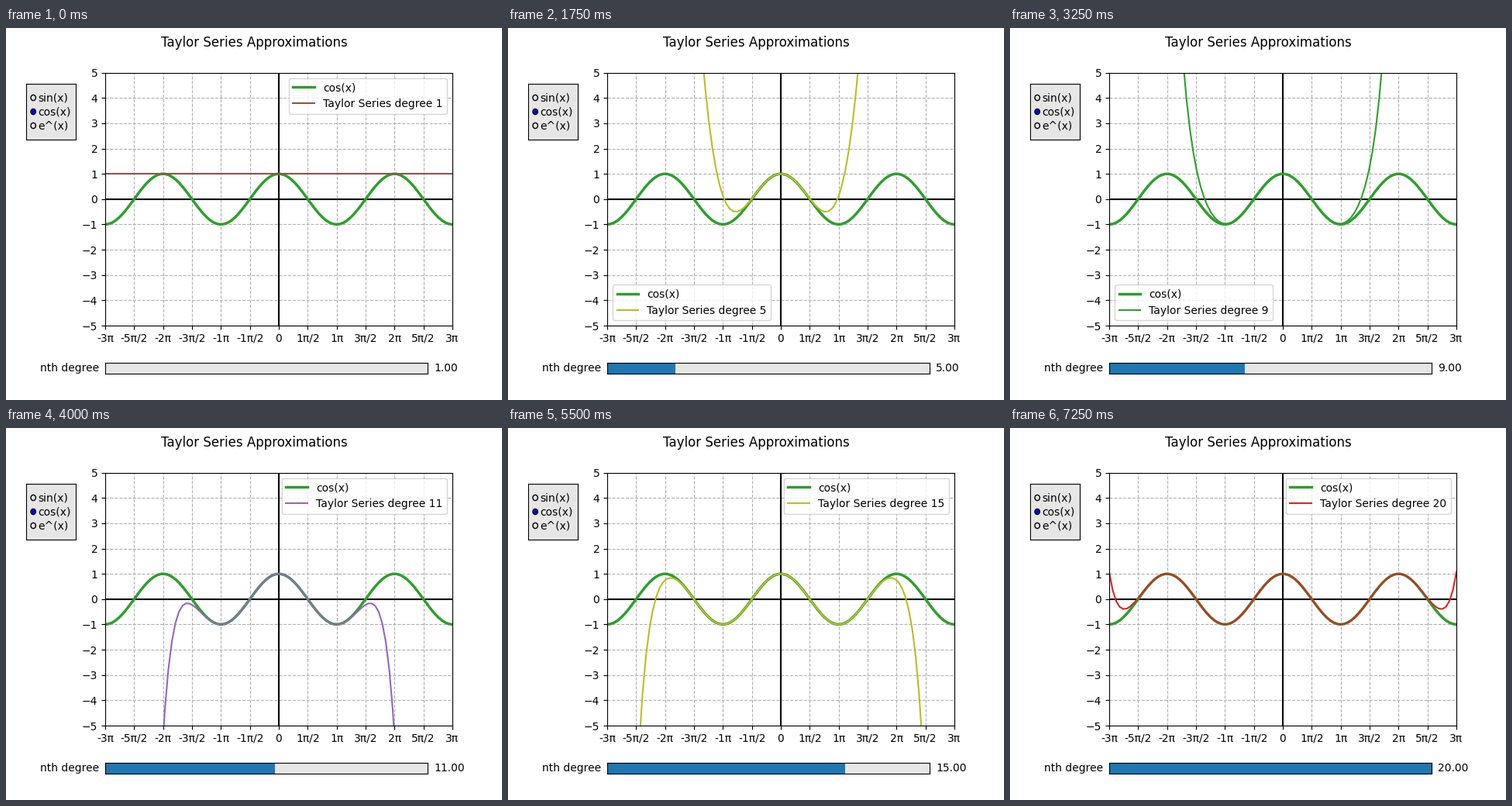
Write a matplotlib script that moves like this. It is 640 px wide and 480 px high and loops after 7750 ms.

```python
import math

import numpy as np
import matplotlib.pyplot as plt
from matplotlib.animation import FuncAnimation
from matplotlib.patches import Circle

TICK_MS = 250
TICKS = 31
STEP_MS = 380
MAX_DEGREE = 20
PANEL = "0.9"


def taylor_cos(x, degree):
    return sum((-1) ** (k // 2) * x ** k / math.factorial(k)
               for k in range(0, degree + 1, 2))


def pi_label(halves):
    if halves == 0:
        return "0"
    return f"{halves // 2}π" if halves % 2 == 0 else f"{halves}π/2"


def bare_axes(rect):
    panel = fig.add_axes(rect, facecolor=PANEL)
    panel.set_xticks([])
    panel.set_yticks([])
    return panel


def add_radio(labels, active):
    panel = bare_axes([0.04, 0.70, 0.10, 0.15])
    heights = np.linspace(1, 0, len(labels) + 2)[1:-1]
    for i, (label, y) in enumerate(zip(labels, heights)):
        panel.add_patch(Circle((0.15, y), 0.05, transform=panel.transAxes,
                               facecolor="blue" if i == active else PANEL,
                               edgecolor="black"))
        panel.text(0.25, y, label, transform=panel.transAxes,
                   ha="left", va="center")


def add_slider(label):
    panel = bare_axes([0.2, 0.07, 0.65, 0.03])
    bar = panel.axvspan(1, 2)
    panel.set_xlim(1, MAX_DEGREE)
    panel.text(-0.02, 0.5, label, transform=panel.transAxes,
               ha="right", va="center")
    value = panel.text(1.02, 0.5, "", transform=panel.transAxes,
                       ha="left", va="center")
    return bar, value


fig = plt.figure(figsize=(6.4, 4.8), dpi=100)
fig.suptitle("Taylor Series Approximations")
ax = fig.add_axes([0.2, 0.2, 0.7, 0.68])

xs = np.linspace(-3 * np.pi, 3 * np.pi, 100)
ax.axhline(0, color="black")
ax.axvline(0, color="black")
ax.plot(xs, np.cos(xs), color="C2", lw=2.5, label="cos(x)")
approx, = ax.plot(xs, taylor_cos(xs, 1) + 0 * xs)
ax.grid(linestyle="--")
ax.set_xlim(-3 * np.pi, 3 * np.pi)
ax.set_ylim(-5, 5)
halves = range(-6, 7)
ax.set_xticks([h * np.pi / 2 for h in halves], [pi_label(h) for h in halves])
ax.set_yticks(range(-5, 6))

add_radio(["sin(x)", "cos(x)", "e^(x)"], active=1)
bar, value_text = add_slider("nth degree")


def update(tick):
    degree = min(MAX_DEGREE, tick * TICK_MS // STEP_MS + 1)
    approx.set_ydata(taylor_cos(xs, degree))
    approx.set_color(f"C{(max(degree, 2) + 3) % 10}")
    approx.set_label(f"Taylor Series degree {degree}")
    ax.legend(loc="best")
    bar.set_width(degree - 1)
    value_text.set_text(f"{degree:.2f}")
    return approx, bar, value_text


anim = FuncAnimation(fig, update, frames=TICKS, interval=TICK_MS,
                     repeat=True, repeat_delay=0, blit=False)
plt.show()
```
